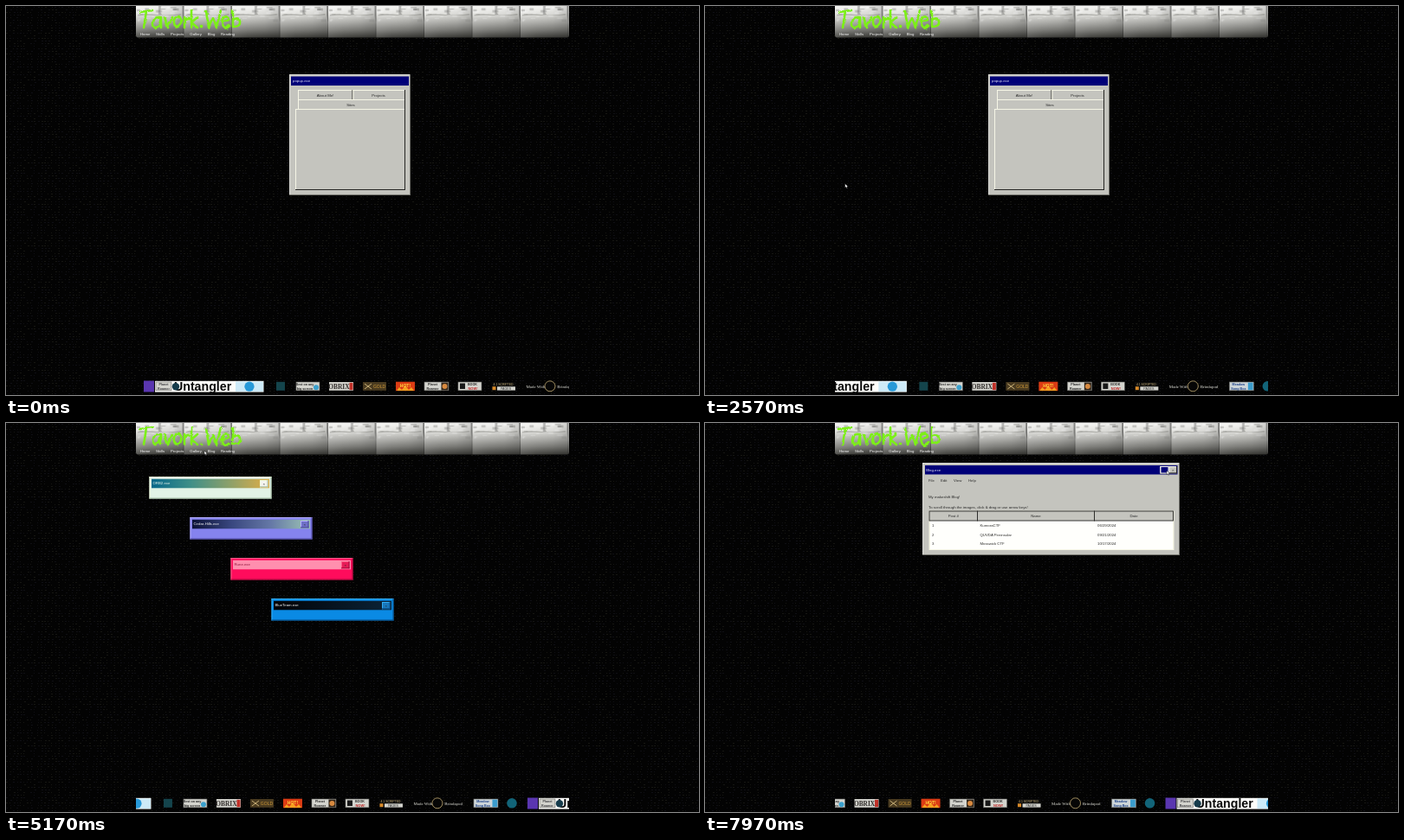
These frames come from a looping animation (800x450 px, 8000 ms). An HTML page:

```html
<!DOCTYPE html>
<html lang="en">
<head>
<meta charset="utf-8">
<title>Retro desktop site</title>
<style>
html, body { margin: 0; width: 100%; height: 100%; overflow: hidden; background: #000; }
svg { display: block; width: 100%; height: 100%; }
text { font-family: "Liberation Sans", Arial, sans-serif; font-size: 4.3px; white-space: pre; }
.serif { font-family: "Liberation Serif", Times, serif; }
</style>
</head>
<body>
<svg id="stage" viewBox="0 0 800 450"></svg>
<script>
const LOOP = 8000;
const FACE = '#c4c4be', LIGHT = '#f6f6e6', DARK = '#262624', NAVY = '#000078', INK = '#282828';
const EDGE = ['#dededa', '#74746e'];

const rect = (x, y, w, h, fill, extra = '') =>
  `<rect x="${x}" y="${y}" width="${w}" height="${h}" fill="${fill}" ${extra}/>`;
const circle = (x, y, r, fill, extra = '') =>
  `<circle cx="${x}" cy="${y}" r="${r}" fill="${fill}" ${extra}/>`;
const path = (d, fill, extra = '') => `<path d="${d}" fill="${fill}" ${extra}/>`;
const text = (x, y, str, fill = INK, extra = '') =>
  `<text x="${x}" y="${y}" fill="${fill}" ${extra}>${str}</text>`;
const mid = 'text-anchor="middle"';
const size = (px, more = '') => `style="font-size:${px}px;${more}"`;
const group = (id, body, extra = '') => `<g id="${id}" ${extra}>${body}</g>`;
const gradient = (id, colours, dir = 'x2="1" y2="0"') =>
  `<linearGradient id="${id}" x1="0" y1="0" ${dir}>` + colours.map((c, i) =>
    `<stop offset="${i / (colours.length - 1)}" stop-color="${c}"/>`).join('') + '</linearGradient>';

// Raised box: light top and left edges, dark bottom and right edges.
function bevel(x, y, w, h, fill = FACE, light = LIGHT, dark = DARK) {
  return rect(x, y, w, h, fill) +
    rect(x, y, w, 1, light) + rect(x, y, 1, h, light) +
    rect(x, y + h - 1, w, 1, dark) + rect(x + w - 1, y, 1, h, dark);
}

function randomizer(seed) {
  return () => (seed = (seed * 16807) % 2147483647) / 2147483647;
}

function backdrop() {
  const rnd = randomizer(71);
  let marks = '';
  for (let y = 1; y < 48; y += 3) {
    for (let x = 0; x < 64; x += 4) {
      if (rnd() < 0.7) marks += rect(x + Math.floor(rnd() * 2), y, 1 + Math.floor(rnd() * 2), 1, rnd() < 0.5 ? '#161612' : '#0f0f14');
    }
  }
  return `<pattern id="weave" width="64" height="48" patternUnits="userSpaceOnUse">${rect(0, 0, 64, 48, '#030303')}${marks}</pattern>`;
}

function stonePattern() {
  const rnd = randomizer(19);
  let spots = '';
  for (let i = 0; i < 24; i++) {
    const y = rnd() * 16;
    spots += rect((rnd() * 48).toFixed(1), y.toFixed(1), (2 + rnd() * 5).toFixed(1), (1 + rnd() * 2).toFixed(1),
      rnd() < 0.7 ? '#ffffff' : '#70706c', `opacity="${(0.42 - y / 60).toFixed(2)}"`);
  }
  const body = rect(0, 0, 55.5, 37, 'url(#stoneDown)') + spots +
    path('M2 10q10 -2 22 0t28 -1v1.4q-14 1 -28 .6t-22 .4z', '#60605c', 'opacity=".35"') +
    path('M26 0h3l-1 7l2 3h-4z', '#585854', 'opacity=".4"') +
    rect(0, 0, 55.5, 37, 'url(#stoneSide)') +
    path('M53.8 0h1.7v37h-1l.6 -18l-1.3 -9z', '#242422', 'opacity=".5"');
  return `<pattern id="stone" x="150" width="55.5" height="37" patternUnits="userSpaceOnUse">${body}</pattern>`;
}

const defs = '<defs>' + backdrop() +
  gradient('stoneDown', ['#f6f6f4', '#e0e0dc', '#aeaeaa', '#787874', '#363632'], 'x2="0" y2="1"') +
  gradient('stoneSide', ['#ffffff20', '#ffffff08', '#00000008', '#00000028']) +
  gradient('reef', ['#08688a', '#3f8f88', '#8da06a', '#e0ae46']) +
  gradient('dusk', ['#0c1238', '#39477f', '#6578a6', '#9cc4b4']) +
  gradient('deep', ['#020408', '#06131f', '#0b2438']) +
  stonePattern() +
  `<filter id="wobble" x="-10%" y="-30%" width="120%" height="160%">
    <feTurbulence id="noise" type="turbulence" baseFrequency=".07" numOctaves="1" seed="1" result="n"/>
    <feDisplacementMap in="SourceGraphic" in2="n" scale="3" xChannelSelector="R" yChannelSelector="G"/>
  </filter>
  <clipPath id="lane">${rect(150, 430, 500, 20, '#000')}</clipPath></defs>`;

const letters = [
  'M154 6l14 -2M161 5l-3 19',
  'M177 12q-8 -1 -8 7t7 3l2 -10l0 12',
  'M182 12l4 12l5 -12',
  'M198 11q-6 1 -5 8t6 3t0 -11',
  'M205 12l0 12M205 17q2 -5 6 -4',
  'M213 5l0 19M220 12l-7 6l7 6',
  'M224 23l1 0',
  'M230 5l3 19l5 -11l4 11l5 -20',
  'M248 18l8 -3q-1 -5 -5 -3t-2 9t8 1',
  'M261 4l0 19q9 0 8 -6t-8 -2'
].join('');

const links = [['Home', 155], ['Skills', 173], ['Projects', 190], ['Gallery', 212.3], ['Blog', 232.7], ['Reading', 248]];

function header() {
  return path('M150 0H650V34q0 2 -2 2.5H152q-2 -.5 -2 -2.5z', 'url(#stone)') +
    path(letters, 'none', 'stroke="#7cf016" stroke-width="2.6" stroke-linecap="round" stroke-linejoin="round" filter="url(#wobble)" role="img" aria-label="Tavork.Web"') +
    links.map(([name, x]) => text(x, 34.2, name, '#ffffff', `id="nav${name}"`)).join('');
}

function homePage() {
  return bevel(327, 79, 140, 140, FACE, ...EDGE) +
    rect(329, 81.5, 136, 10.5, NAVY) + text(331, 88.3, 'popup.exe', '#f0f0ff') +
    bevel(337, 97, 63.5, 12) + bevel(400.5, 97, 60.5, 12) +
    bevel(337, 108, 124, 12) + bevel(334, 119, 127, 94) +
    text(368.5, 104.8, 'About Me!', INK, mid) + text(430, 104.8, 'Projects', INK, mid) +
    text(398, 115.6, 'Sites', INK, mid);
}

const albums = [
  { name: 'ORB2.exe', bar: 'url(#reef)', body: '#e2f3e6', light: '#f0fbdc', dark: '#a6c0a6', btn: '#f4f4ee', ink: '#f4fff4' },
  { name: 'Cedar-Hills.exe', bar: 'url(#dusk)', body: '#8583ee', light: '#b4aeff', dark: '#4a4498', btn: '#6f70c8', ink: '#ffffff' },
  { name: 'Rune.exe', bar: '#ff8fae', body: '#ff0c5c', light: '#ff5a88', dark: '#a00838', btn: '#e81c58', ink: '#8a1238' },
  { name: 'BlueTeam.exe', bar: 'url(#deep)', body: '#0a8ae4', light: '#32aef4', dark: '#064c86', btn: '#1878bc', ink: '#ffffff' }
];

function galleryPage() {
  return albums.map((a, i) => {
    const x = 165.5 + i * 47, y = 62 + i * 47;
    return bevel(x, y, 141, 25.5, a.body, a.light, a.dark) +
      rect(x + 2.5, y + 2.8, 136, 10.5, a.bar) +
      text(x + 4, y + 9.4, a.name, a.ink) +
      bevel(x + 127.5, y + 4, 9.5, 8.3, a.btn, a.light, a.dark) +
      text(x + 132.2, y + 9.7, '×', INK, mid);
  }).join('');
}

const posts = [
  ['1', 'KumoraCTF', '06/29/2024'],
  ['2', 'QUVDA Peninsular', '09/21/2024'],
  ['3', 'Mosswick CTF', '10/17/2024']
];

function blogPage() {
  const cols = [[259, 55.5, 'Post #'], [314.5, 135, 'Name'], [449.5, 91, 'Date']];
  const inset = [262, 317.5, 453];
  const sheet = bevel(251, 46, 297, 107, FACE, ...EDGE) +
    text(258, 86.8, 'My makeshift Blog!') +
    text(258, 99, 'To scroll through the images, click &amp; drag or use arrow keys!') +
    rect(258.5, 101.5, 283, 45.5, LIGHT) + rect(260, 113, 280, 33, '#fffffc') +
    cols.map(([x, w, name]) => rect(x, 102, w, 11, FACE, `stroke="${DARK}" stroke-width=".9"`) +
      text(x + w / 2, 109, name, INK, mid)).join('') +
    posts.map((row, i) => row.map((cell, c) => text(inset[c], 120 + i * 10.5, cell)).join('')).join('');
  return group('folded', bevel(251, 46, 297, 37, FACE, ...EDGE)) +
    group('sheet', sheet) +
    rect(254, 49, 291.5, 10.5, NAVY) + text(255.3, 56, 'Blog.exe', '#f4f4ff') +
    bevel(525.5, 50, 9.5, 8.4) + rect(528.3, 52.5, 4, 3.5, 'none', `stroke="${DARK}" stroke-width=".7"`) +
    bevel(535.5, 50, 9.5, 8.4) + text(540.2, 55.8, '×', INK, mid) +
    group('pressed', rect(526, 50.5, 9, 7.5, NAVY, 'stroke="#fffff0" stroke-width="1"')) +
    [['File', 258], ['Edit', 272], ['View', 287], ['Help', 304]].map(([s, x]) => text(x, 67.6, s)).join('');
}

const PAPER = '#d4d4ce';
function plate(x, w, fill, top, low, ink = INK, width = w) {
  const c = x + width / 2;
  return rect(x, 435, w, 9.8, fill, 'stroke="#686864" stroke-width=".6"') +
    text(c, 439.4, top, ink, `${mid} ${size(3.7, 'font-weight:bold')}`) +
    text(c, 443.6, low, ink, `${mid} ${size(3.7, 'font-weight:bold')}`);
}

function badges() {
  const gold = '#c8b078';
  return rect(159, 433.5, 12, 13, '#5a36b0') +
    rect(172, 433.8, 125.5, 12.8, '#fdfdfa') +
    text(194, 445, 'Untangler', '#080808', size(14.2, 'font-weight:bold')) +
    rect(265, 434.5, 32, 11.5, '#cdeaf7') + circle(281, 440.2, 5.6, '#2799d8') +
    plate(173, 18, PAPER, 'Planet', 'Roamer', '#404044') + circle(196, 440.2, 4.2, '#163c4c') +
    rect(312, 434.8, 10, 10, '#14444c') +
    plate(335, 27, PAPER, 'Best on any', 'big screen', INK, 20) + circle(358, 441.2, 3, '#3ba0cc') +
    rect(373, 435, 28, 9.8, '#d0d0ca') + rect(396.5, 435.8, 4, 8.4, '#c03028') +
    text(384.5, 443.3, 'OBRIX', '#302c2a', `class="serif" ${mid} ${size(7.4, 'font-weight:bold')}`) +
    rect(412, 435, 27, 9.8, '#4a3b20') + path('M414 437l8 6M414 443l8 -6', 'none', `stroke="${gold}"`) +
    text(431, 442, 'GOLD', '#d09a38', `${mid} ${size(5)}`) +
    rect(450, 434.7, 22, 10.5, '#dc3c14') + path('M451 445l3 -4l3 3l4 -5l4 5l3 -3l3 4z', '#f4a020') +
    text(461, 440.5, 'HOT!', '#ffd840', `${mid} ${size(5, 'font-weight:bold')}`) +
    plate(483, 28, PAPER, 'Planet', 'Roamer', INK, 19) + rect(502.5, 435.5, 8, 9, '#302418') + circle(506.5, 440, 3, '#d88a40') +
    plate(522, 27, PAPER, 'BOOK', '', INK, 33) +
    rect(524, 436.5, 6, 6.5, '#181818') + text(539, 443.6, 'NOW!', '#c02828', `${mid} ${size(4, 'font-weight:bold')}`) +
    rect(560.5, 435, 27.5, 9.8, '#0a0a0a') + text(574, 439.3, '4.1 SCRIPTED', gold, `${mid} ${size(3.4)}`) +
    rect(567, 440.3, 21, 4.3, PAPER) + text(577, 443.8, 'PAGES', INK, `${mid} ${size(3.6)}`) + rect(561.5, 440.2, 4, 4, '#d88a28') +
    text(600.5, 441.6, 'Made With', '#e4e4dc', `class="serif" ${size(4.9)}`) +
    circle(628, 439.8, 6, '#060606', `stroke="${gold}" stroke-width=".8"`) +
    text(636.3, 441.6, 'Brindapod', '#e4e4dc', `class="serif" ${size(4.9)}`) +
    plate(670, 28, '#ccd4d8', 'Meadow', 'Song Box', '#1c4088', 21) + rect(691.5, 435.6, 5.8, 8.6, '#3b9ccc') +
    circle(714, 439.8, 5.8, '#126478');
}

const SPAN = 573, SPEED = 25.15;
const strip = group('strip', group('set', badges()) + `<use href="#set" x="${SPAN}"/>`);

const arrow = path('M0 0V4.6L1.1 3.7L1.9 5.4L2.7 5L2 3.4H3.4z', '#fff', 'stroke="#000" stroke-width=".4"');
const hand = path('M0 0q1 -.6 1.1 .4v2l2.4 .6q.8 .4 .6 1.4l-.7 2.1h-2.7l-2 -2.7q0 -.9 .9 -.4l.4 .5z', '#fff', 'stroke="#000" stroke-width=".4"');

document.getElementById('stage').innerHTML = defs +
  rect(0, 0, 800, 450, 'url(#weave)') + header() +
  group('home', homePage()) + group('gallery', galleryPage()) + group('blog', blogPage()) +
  `<g clip-path="url(#lane)">${strip}</g>` +
  group('status', rect(0, 443.6, 46.5, 6.4, '#2a0c3c') + text(1, 448.4, '', '#efd8f0', `id="address" ${size(3.7)}`)) +
  group('cursor', group('arrow', arrow) + group('hand', hand));

const el = id => document.getElementById(id);
const show = (id, on) => { el(id).style.display = on ? '' : 'none'; };
const within = (t, a, b) => t >= a && t < b;

// Pointer stops: time, x, y.
const route = [
  [2250, 151, 262], [2570, 161.7, 205.6], [2800, 164, 196], [3500, 207, 66], [3770, 212, 46],
  [4250, 218, 33], [4900, 219, 33], [5170, 229, 32], [5400, 236, 32], [6450, 236.5, 32],
  [7050, 532.5, 54.5], [8000, 533, 55]
];

function pointer(t) {
  let i = 0;
  while (i < route.length - 2 && t >= route[i + 1][0]) i++;
  const [t0, x0, y0] = route[i], [t1, x1, y1] = route[i + 1];
  const k = Math.min(1, Math.max(0, (t - t0) / (t1 - t0)));
  const e = k * k * (3 - 2 * k);
  return [x0 + (x1 - x0) * e, y0 + (y1 - y0) * e];
}

function draw(t) {
  el('strip').setAttribute('transform', `translate(${(-SPEED * t / 1000).toFixed(2)} 0)`);
  el('noise').setAttribute('seed', 1 + Math.floor(t / 200) % 4);

  show('home', t < 4600);
  show('gallery', within(t, 4600, 5900));
  show('blog', t >= 5900);
  show('folded', t < 7450);
  show('sheet', t >= 7450);
  show('pressed', t >= 7050);

  const onGallery = within(t, 4200, 4950), onBlog = within(t, 5370, 6520);
  el('navGallery').setAttribute('fill', onGallery ? '#4cb030' : '#ffffff');
  el('navBlog').setAttribute('fill', onBlog ? '#4cb030' : '#ffffff');
  show('status', onGallery || within(t, 5370, 6750));
  el('address').textContent = 'https://tavork.example/' + (t < 5000 ? 'pics' : 'blog');

  const [x, y] = pointer(t);
  show('cursor', t >= 2250);
  show('hand', onGallery || onBlog);
  show('arrow', !(onGallery || onBlog));
  el('cursor').setAttribute('transform', `translate(${x.toFixed(2)} ${y.toFixed(2)})`);
}

function tick() {
  draw(performance.now() % LOOP);
  requestAnimationFrame(tick);
}
tick();
</script>
</body>
</html>
```
